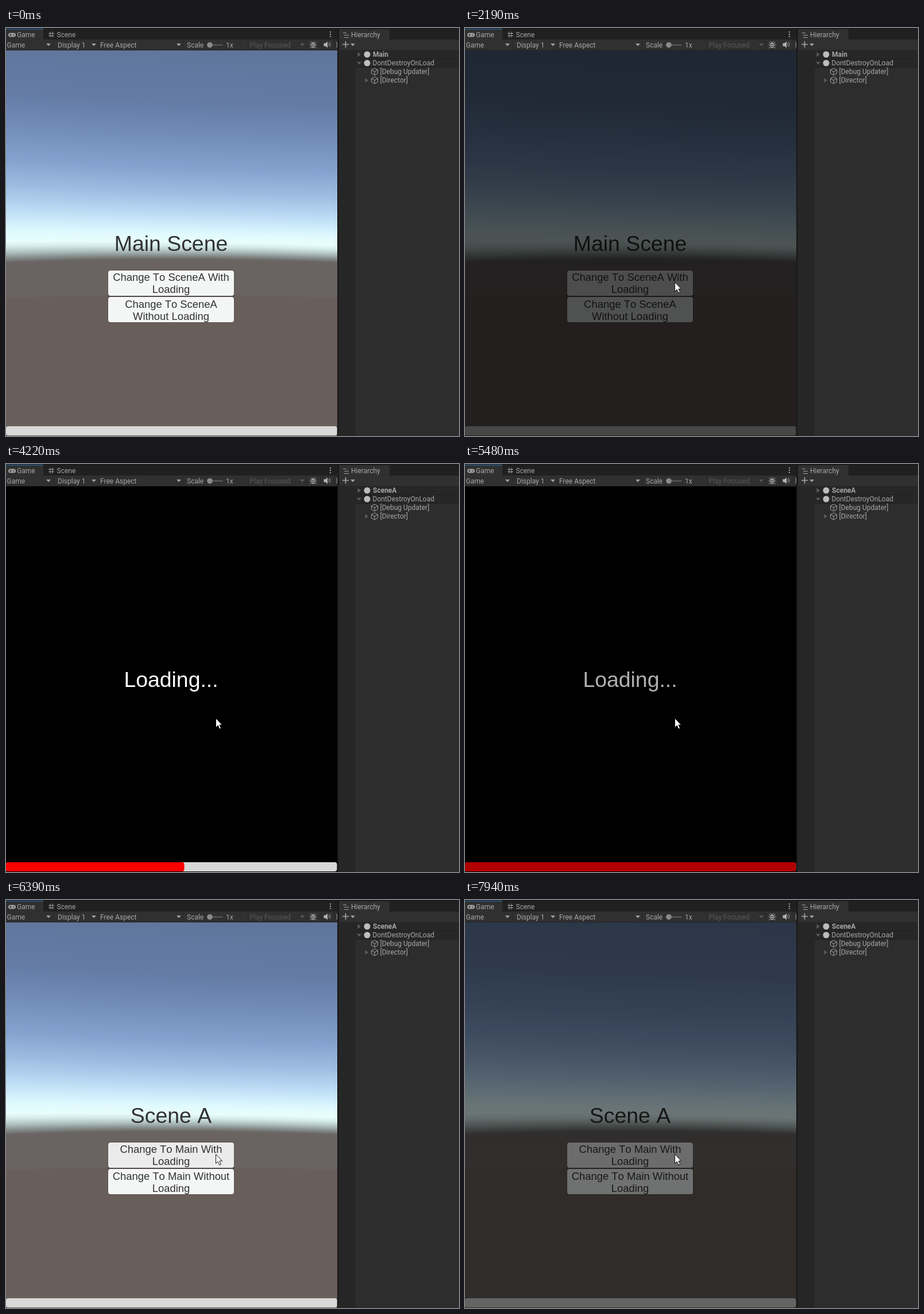
Recreate the animation shown at these times as an HTML page with a canvas. Size 789 by 710 pixels, loop 8 s.

```html
<!DOCTYPE html>
<html lang="en">
<head>
<meta charset="utf-8">
<style>
  html, body { margin: 0; width: 100%; height: 100%; overflow: hidden; background: #191919; }
  canvas, svg { position: absolute; left: 0; top: 0; display: block; }
  text { font: 12px Roboto, sans-serif; fill: #a6a6a6; white-space: pre; }
  .bold { font-weight: 700; }
  .off { fill: #585858; }
  .game text { font: 18.4px "Liberation Sans", Arial, sans-serif; font-kerning: none; text-anchor: middle; fill: #323232; }
  .game .title { font-size: 37.4px; }
  .line { fill: none; stroke: #a0a0a0; }
</style>
</head>
<body>
<canvas id="sky" width="577" height="710"></canvas>
<svg width="789" height="710" viewBox="0 0 789 710">
  <defs>
    <path id="down" d="M-4-2h8l-4 4.5z"/>
    <path id="right" d="M-2.5-4v8l5.5-4z" fill="#5c5c5c"/>
    <g id="cube" class="line"><path d="M0-6 5.5-3v6L0 6-5.5 3v-6zM-5.5-3 0 0 5.5-3M0 0v6"/></g>
    <circle id="badge" r="5.5" fill="#bdbdbd"/>
  </defs>

  <g class="game">
    <g id="scene">
      <text id="title" class="title" x="287.5" y="388"></text>
      <rect x="177.5" y="421.5" width="220" height="91" rx="4" fill="#000" opacity=".25"/>
      <rect id="hot" x="178" y="422" width="219" height="44" rx="4"/>
      <rect x="178" y="468" width="219" height="44" rx="4" fill="#f4f6f6"/>
      <text id="line0" x="287.5" y="440.3"></text>
      <text id="line1" x="287.5" y="461.3"></text>
      <text id="line2" x="287.5" y="486.7"></text>
      <text id="line3" x="287.5" y="507.7"></text>
    </g>
    <g id="loading">
      <rect y="39" width="577" height="671"/>
      <text class="title" x="287.5" y="388" style="fill:#fff">Loading...</text>
    </g>
    <rect y="693" width="576.5" height="16" rx="4" fill="#d8d8d8"/>
    <rect id="progress" y="693" height="16" rx="4" fill="#f00"/>
    <rect id="dim" y="39" width="577" height="671"/>
  </g>

  <!-- game view chrome -->
  <rect width="789" height="39" fill="#191919"/>
  <rect y="2" width="577" height="18" fill="#202020"/>
  <rect y="2" width="65" height="18" fill="#303030"/>
  <rect y="1" width="65" height="1.5" fill="#2c5d87"/>
  <rect y="20" width="577" height="18.5" fill="#303030"/>
  <path d="M82.5 20v18M160.5 20v18M308.5 20v18M421.5 20v18M523.5 20v18M547.5 20v18M571.5 20v18" stroke="#282828"/>
  <rect x="4" y="8.500" width="13" height="7" rx="3.500" fill="#a0a0a0"/>
  <path d="M6 12h4M8 10v4M13 11h2M12 13h2" stroke="#303030"/>
  <path class="line" d="M77 6.500v10M81 6.500v10M74 9.500h10M74 13.500h10"/>
  <text x="19" y="16">Game</text>
  <text x="88.500" y="16">Scene</text>
  <g fill="#a0a0a0">
    <circle cx="565" cy="7" r="1.200"/><circle cx="565" cy="11" r="1.200"/><circle cx="565" cy="15" r="1.200"/>
    <use href="#down" x="74" y="29"/><use href="#down" x="153" y="29"/><use href="#down" x="301" y="29"/>
    <use href="#down" x="516" y="29" class="off"/>
  </g>
  <text x="1.500" y="33.500">Game</text>
  <text x="90" y="33.500">Display 1</text>
  <text x="164" y="33.500">Free Aspect</text>
  <text x="315" y="33.500">Scale</text>
  <path d="M350 29.500h27.500" stroke="#5e5e5e" stroke-width="2"/>
  <circle cx="355" cy="29.500" r="4.800" fill="#8a8a8a"/>
  <text x="383" y="33.500">1x</text>
  <text class="off" x="424.500" y="33.500">Play Focused</text>
  <path class="line" d="M529 25l3 2M541 25l-3 2M528.500 29.500h13M529 35l3-2M541 35l-3-2M532 23l2 2M538 23l-2 2"/>
  <ellipse cx="535" cy="30" rx="3.700" ry="5" fill="#a0a0a0"/>
  <path d="M532 29h6M532 32h6" stroke="#303030"/>
  <path d="M553.500 26.500h3l3.500-3v11l-3.500-3h-3z" fill="#b4b4b4"/>
  <path class="line" d="M561.500 26q2 2.500 0 5M563 24q4 4.500 0 9"/>
  <path d="M576.500 24v10" stroke="#a0a0a0"/>

  <!-- hierarchy panel -->
  <rect x="577" width="3" height="710" fill="#191919"/>
  <rect x="580" y="2" width="209" height="18" fill="#202020"/>
  <rect x="580" y="2" width="88" height="18" fill="#303030"/>
  <rect x="580" y="20" width="209" height="18.500" fill="#303030"/>
  <rect x="579.500" y="38" width="210" height="672" fill="#2d2d2d"/>
  <rect x="579.500" y="38" width="29.500" height="672" fill="#262626"/>
  <path class="line" d="M587 8.500h6M589 12.500h8M589 16.500h8"/>
  <text x="601" y="16">Hierarchy</text>
  <path d="M586 28.500h11M591.500 23v11" stroke="#a8a8a8" stroke-width="1.600"/>
  <use href="#down" x="604" y="29" fill="#a0a0a0"/>
  <g>
    <rect x="609" y="38.500" width="180" height="15" fill="#272727"/>
    <path d="M609 53.500h180" stroke="#1f1f1f"/>
    <use href="#right" x="615" y="46"/><use href="#badge" x="629" y="46"/>
    <text id="active" class="bold" x="639" y="50"></text>
  </g>
  <g id="pending">
    <rect x="609" y="54" width="180" height="14" fill="#272727"/>
    <path d="M609 68.500h180" stroke="#1f1f1f"/>
    <use href="#right" x="615" y="61"/><use href="#badge" x="629" y="61"/>
    <text x="639" y="65">SceneA (is loading)</text>
  </g>
  <g id="persistent">
    <rect x="609" y="54" width="180" height="14" fill="#272727"/>
    <path d="M609 68.500h180" stroke="#1f1f1f"/>
    <use href="#down" x="615" y="61" fill="#5c5c5c"/><use href="#badge" x="629" y="61"/>
    <text x="638.500" y="65">DontDestroyOnLoad</text>
    <use href="#cube" x="642" y="76"/><text x="651.500" y="80">[Debug Updater]</text>
    <use href="#right" x="628" y="91"/><use href="#cube" x="642" y="91"/><text x="651.500" y="95">[Director]</text>
  </g>

  <path id="cursor" d="M0 0V16L3.700 12.600 6.400 18.600 9 17.400 6.400 11.600H11Z" fill="#fff" stroke="#000" stroke-width=".9"/>
</svg>
<script>
const LOOP = 8000, FADE = 500;
const FADE_OUT = 1734, LOADING = 2234, LOADED = 5201, SCENE_A = 5724, FADE_AGAIN = 7533;
const ROW_ADDED = 2890, SWAP = 4150, PRESS = 1630;
const $ = id => document.getElementById(id);
const clamp = v => Math.max(0, Math.min(1, v));
const mix = (a, b, p) => a + (b - a) * p;
const show = (id, on) => $(id).style.display = on ? '' : 'none';
const write = (id, text) => { if ($(id).textContent !== text) $(id).textContent = text; };

const SCENES = {
  main: ['Main Scene', 'Change To SceneA With', 'Loading', 'Change To SceneA', 'Without Loading'],
  a: ['Scene A', 'Change To Main With', 'Loading', 'Change To Main Without', 'Loading']
};

// Skybox: one vertical gradient per column, tilted above and arched at the horizon.
function paintSky() {
  const stops = [[39, '#5f769c'], [130, '#647ca6'], [190, '#728eb9'], [245, '#86a3cf'], [285, '#9dbbe1'],
    [315, '#b4d4f0'], [340, '#cdebfb'], [358, '#e0fafe'], [372, '#e8fdfc'], [380, '#d2e8e6'],
    [388, '#afc0bd'], [395, '#8a9492'], [402, '#6b6766'], [406, '#696362'], [462, '#6a6361'], [466, '#695f5a']];
  const g = $('sky').getContext('2d');
  for (let x = 0; x < 577; x++) {
    const u = x / 288 - 1, fill = g.createLinearGradient(0, 0, 0, 710);
    for (const [y, color] of stops) {
      const near = clamp((y - 39) / 363) ** 4;
      fill.addColorStop(clamp((y + mix(12 * u - 5 * u * u, 6 * u * u, near)) / 710), color);
    }
    g.fillStyle = fill;
    g.fillRect(x, 39, 1, 671);
  }
}

// Light left by the black fades, in linear colour space.
function light(t) {
  if (t < LOADING) return 1 - clamp((t - FADE_OUT) / FADE);
  if (t < LOADED) return clamp((t - LOADING) / FADE);
  if (t < SCENE_A) return 1 - clamp((t - LOADED) / FADE);
  if (t < FADE_AGAIN) return clamp((t - SCENE_A) / FADE);
  return 1 - clamp((t - FADE_AGAIN) / FADE);
}

function moveCursor(t) {
  const enter = 1 - (1 - clamp((t - 170) / 790)) ** 1.6;
  const settle = clamp((t - 960) / 340);
  const x = mix(513, 391, enter) - 25.500 * settle;
  const y = mix(700, 446, enter) - 3.500 * settle;
  $('cursor').setAttribute('transform', `translate(${x} ${y})`);
  show('cursor', t >= 190);
}

function draw(t) {
  const loading = t >= LOADING && t < SCENE_A;
  show('scene', !loading);
  show('loading', loading);
  const [title, ...lines] = t < LOADING ? SCENES.main : SCENES.a;
  write('title', title);
  lines.forEach((line, i) => write('line' + i, line));
  $('hot').setAttribute('fill', t < PRESS ? '#f4f6f6' : '#ebebeb');

  const half = start => clamp((t - start) / 1045) / 2;
  const progress = half(2800) + half(4140);
  show('progress', loading && progress > 0);
  $('progress').setAttribute('width', 576.500 * progress);
  $('dim').setAttribute('opacity', 1 - light(t) ** (1 / 2.2));

  const pending = t >= ROW_ADDED && t < SWAP;
  write('active', t < SWAP ? 'Main' : 'SceneA');
  show('pending', pending);
  $('persistent').setAttribute('transform', `translate(0 ${pending ? 15 : 0})`);
  moveCursor(t);
}

paintSky();
const start = performance.now();
function tick() {
  draw((performance.now() - start) % LOOP);
  requestAnimationFrame(tick);
}
tick();
</script>
</body>
</html>
```
